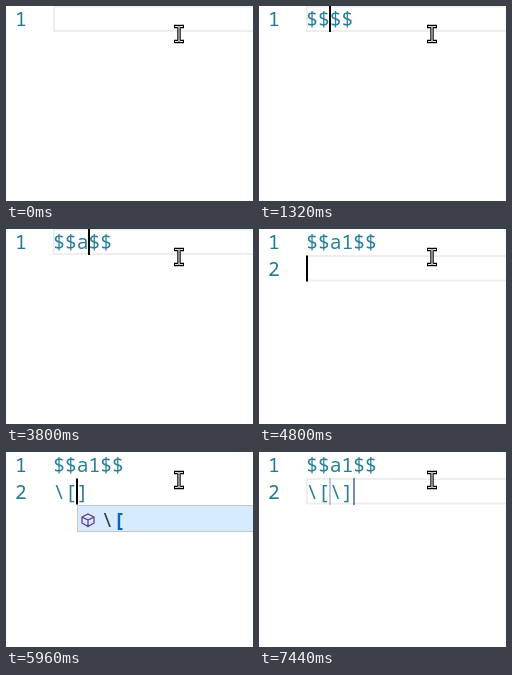
Write an HTML page that moves like this. It is 247x195 px and loops after 8 s.

```html
<!DOCTYPE html>
<html lang="en">
<head>
<meta charset="utf-8">
<title>Typing math delimiters</title>
<style>
  html, body { margin: 0; width: 100%; height: 100%; overflow: hidden; background: #fff; }
  svg { display: block; width: 247px; height: 195px; }
  text { font: 19.58px "Noto Sans Mono", monospace; fill: #267f99; white-space: pre; }
  .number { fill: #237893; }
  .match { font-weight: 700; fill: #0066bf; }
</style>
</head>
<body>
<svg viewBox="0 0 247 195">
  <rect id="highlight" x="48" width="220" height="24.5" fill="none" stroke="#eee" stroke-width="2"/>
  <text class="number" x="9" y="20">1</text>
  <text class="number" id="number2" x="9" y="47">2</text>
  <text id="line1" x="47.3" y="20"></text>
  <text id="line2" x="47.3" y="47"></text>
  <g id="tabstops">
    <rect x="70" y="26" width="2" height="27" fill="#0a3264" opacity=".25"/>
    <rect x="94" y="26" width="2" height="27" fill="#0a3264" opacity=".55"/>
  </g>
  <rect id="caret" width="2" height="26"/>
  <g id="popup">
    <rect x="71.5" y="53.5" width="200" height="26" fill="#d6ebff" stroke="#c8c8c8"/>
    <path d="M82 62l6 3v6l-6 3.5-6-3.5v-6zM76 65l6 3 6-3M82 68v6.5" fill="none" stroke="#652d90" stroke-width="1.2"/>
    <text x="95.5" y="75" style="fill:#333">\<tspan class="match">[</tspan></text>
  </g>
  <g fill="none">
    <path d="M168 20.5h4l1 1 1-1h4M168 35.5h4l1-1 1 1h4M173 21v14" stroke="#000" stroke-width="3.4"/>
    <path d="M169 20.5h3l1 1 1-1h3M169 35.5h3l1-1 1 1h3M173 21v14" stroke="#ddd" stroke-width="1.2"/>
  </g>
</svg>
<script>
const LOOP = 8000, ADVANCE = 11.75;
const el = id => document.getElementById(id);
const show = (id, on) => el(id).setAttribute("visibility", on ? "visible" : "hidden");
const off = { caret: false }, on = { caret: true };
const at = (col, more) => ({ col, caret: true, ...more });

// Each step changes only the listed parts of the editor state.
const steps = [
  [0, { row: 0, col: 0, line1: "", line2: "", caret: false, popup: false, tabstops: false, highlight: true }],
  [80, at(1, { line1: "$" })],
  [240, at(2, { line1: "$$" })],
  [360, at(3, { line1: "$$$" })],
  [480, at(4, { line1: "$$$$" })],
  [1000, off],
  [1160, at(3)],
  [1320, at(2)],
  [1400, at(1)],
  [1720, at(2)],
  [2160, off], [2720, on], [3160, off], [3640, on],
  [3800, at(3, { line1: "$$a$$" })],
  [3960, { line1: "$$a1$$" }],
  [4040, at(4)],
  [4520, off],
  [4800, at(0, { row: 1 })],
  [5280, off],
  [5840, at(1, { line2: "\\" })],
  [5880, at(2, { line2: "\\[]" })],
  [5960, { popup: true, highlight: false }],
  [6040, { line2: "\\[\\]", tabstops: true }],
  [6120, { popup: false }],
  [6200, { highlight: true }],
  [6440, off], [7000, on], [7440, off]
];

function draw(now) {
  const t = now % LOOP;
  const s = Object.assign({}, ...steps.filter(([start]) => start <= t).map(([, change]) => change));
  el("line1").textContent = s.line1;
  el("line2").textContent = s.line2;
  el("caret").setAttribute("x", Math.floor(47 + s.col * ADVANCE));
  el("caret").setAttribute("y", s.row * 26.5);
  el("highlight").setAttribute("y", s.row ? 27 : 0.5);
  for (const id of ["caret", "popup", "tabstops", "highlight"]) show(id, s[id]);
  show("number2", s.row);
  requestAnimationFrame(draw);
}
requestAnimationFrame(draw);
</script>
</body>
</html>
```
